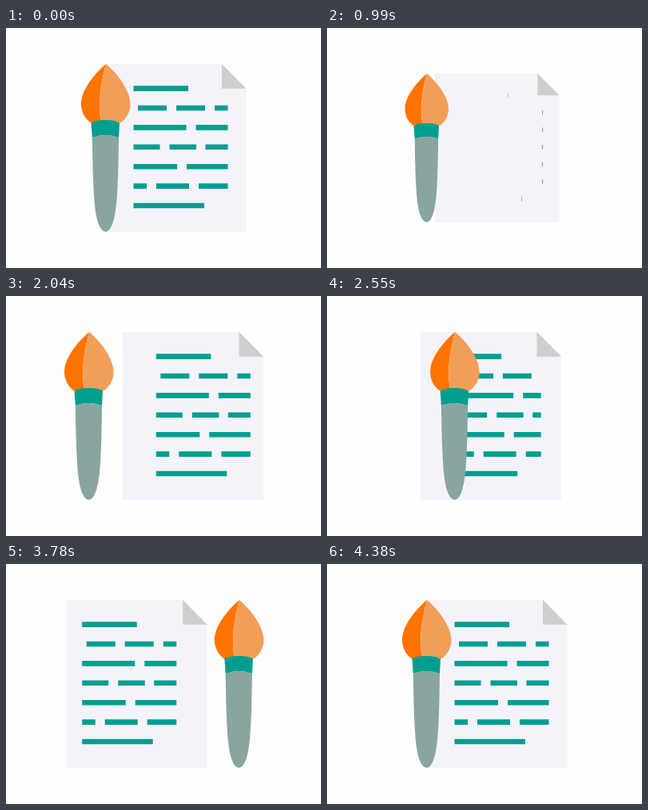
Write an HTML page that moves like this. It is 394 by 300 pixels and loops after 4.47 s.

```html
<!DOCTYPE html>
<html lang="en">
<head>
<meta charset="utf-8">
<title>Brush and page</title>
<style>
  html, body { margin: 0; width: 100%; height: 100%; overflow: hidden; background: #fefefe; }
  svg { display: block; width: 100%; height: 100%; }
  #rows line { stroke: #009e90; stroke-width: 6.6; }
</style>
</head>
<body>
<svg viewBox="0 0 394 300" preserveAspectRatio="xMinYMin meet">
  <g id="page">
    <path fill="#f4f3fa" d="M124.5 45H270L300.5 75.7V255H124.5Z"/>
    <path fill="#cecece" d="M270 45V75.7H300.5Z"/>
  </g>
  <g id="rows"></g>
  <g id="brush">
    <path fill="#ff7300" d="M125 45C111 57 94 77 94 95C94 106 100 115 107 119H120C116 106 115 82 125 45Z"/>
    <path fill="#f19e58" d="M125 45C139 57 155.5 77 155.5 96C155.5 106 149 115 142 119H120C116 106 115 82 125 45Z"/>
    <path fill="#009e90" d="M106.5 119C111 113.8 137.5 113.8 142 119L141 137Q124.5 131 107.8 137Z"/>
    <path fill="#88a5a0" d="M107.8 137Q124.5 131 141 137C140.6 168 140 197 138.3 217C136 242 131 254.7 124.5 254.7C118 254.7 112.6 242 110.6 217C109 197 108.2 168 107.8 137Z"/>
  </g>
</svg>
<script>
const LOOP = 4470, STEP = 30;

// Keys are [time, value]; values ease in and out between them.
const tracks = {
  pageScale:  [[0, 1], [555, 1.15], [1110, .85], [1680, 1]],
  brushScale: [[0, 1], [555, 1.15], [1110, .85], [1620, 1]],
  pageX:  [[1620, 0], [2145, 24], [3060, -52], [3675, -52], [4380, 0]],
  brushX: [[1620, 0], [2160, -24], [3240, 175], [3690, 175], [4380, 0]]
};

// Each pass wipes the rows away from the left, then writes them again.
const passes = [
  { wipe: 455, write: 1018, end: 1580 },
  { wipe: 2460, write: 2830, end: 3200 }
];

// [left, width, dashes]
const rows = [
  [159.5, 68.5, ""],
  [165, 112.5, "36 12 36 12 40 12"],
  [159.5, 118, "66 12"],
  [159.5, 118, "33 12 33.5 11.5"],
  [159.5, 118, "54.5 12"],
  [159.5, 118, "16.5 12 41 12 48 12"],
  [159.5, 88.5, ""]
];

const byId = id => document.getElementById(id);
const page = byId("page"), rowGroup = byId("rows"), brush = byId("brush");

const lines = rows.map(([, , dashes], i) => {
  const line = document.createElementNS("http://www.w3.org/2000/svg", "line");
  const y = 75.6 + i * 24.4;
  line.setAttribute("y1", y);
  line.setAttribute("y2", y);
  if (dashes) line.setAttribute("stroke-dasharray", dashes);
  return rowGroup.appendChild(line);
});

function ease(t, from, to) {
  const u = Math.min(1, Math.max(0, (t - from) / (to - from)));
  return u * u * (3 - 2 * u);
}

function valueAt(keys, t) {
  let value = keys[0][1];
  for (let i = 1; i < keys.length; i++) {
    value += (keys[i][1] - keys[i - 1][1]) * ease(t, keys[i - 1][0], keys[i][0]);
  }
  return value;
}

function trimAt(t) {
  for (const { wipe, write, end } of passes) {
    if (t < wipe || t > end) continue;
    return t < write ? [ease(t, wipe, write), 1] : [0, ease(t, write, end)];
  }
  return [0, 1];
}

function place(el, x, scale, cx) {
  el.setAttribute("transform",
    `translate(${cx + x} 150) scale(${scale}) translate(${-cx} -150)`);
}

function draw(t) {
  const scale = valueAt(tracks.pageScale, t), x = valueAt(tracks.pageX, t);
  place(page, x, scale, 212.5);
  place(rowGroup, x * 1.315, scale, 212.5);
  place(brush, valueAt(tracks.brushX, t), valueAt(tracks.brushScale, t), 124.5);

  const [start, end] = trimAt(t);
  lines.forEach((line, i) => {
    const [left, width] = rows[i];
    line.setAttribute("x1", left + width * start);
    line.setAttribute("x2", left + width * end);
  });
}

const begin = performance.now();
function tick() {
  const t = (performance.now() - begin) % LOOP;
  draw(Math.min(4380, Math.floor(t / STEP) * STEP));
  requestAnimationFrame(tick);
}
tick();
</script>
</body>
</html>
```
